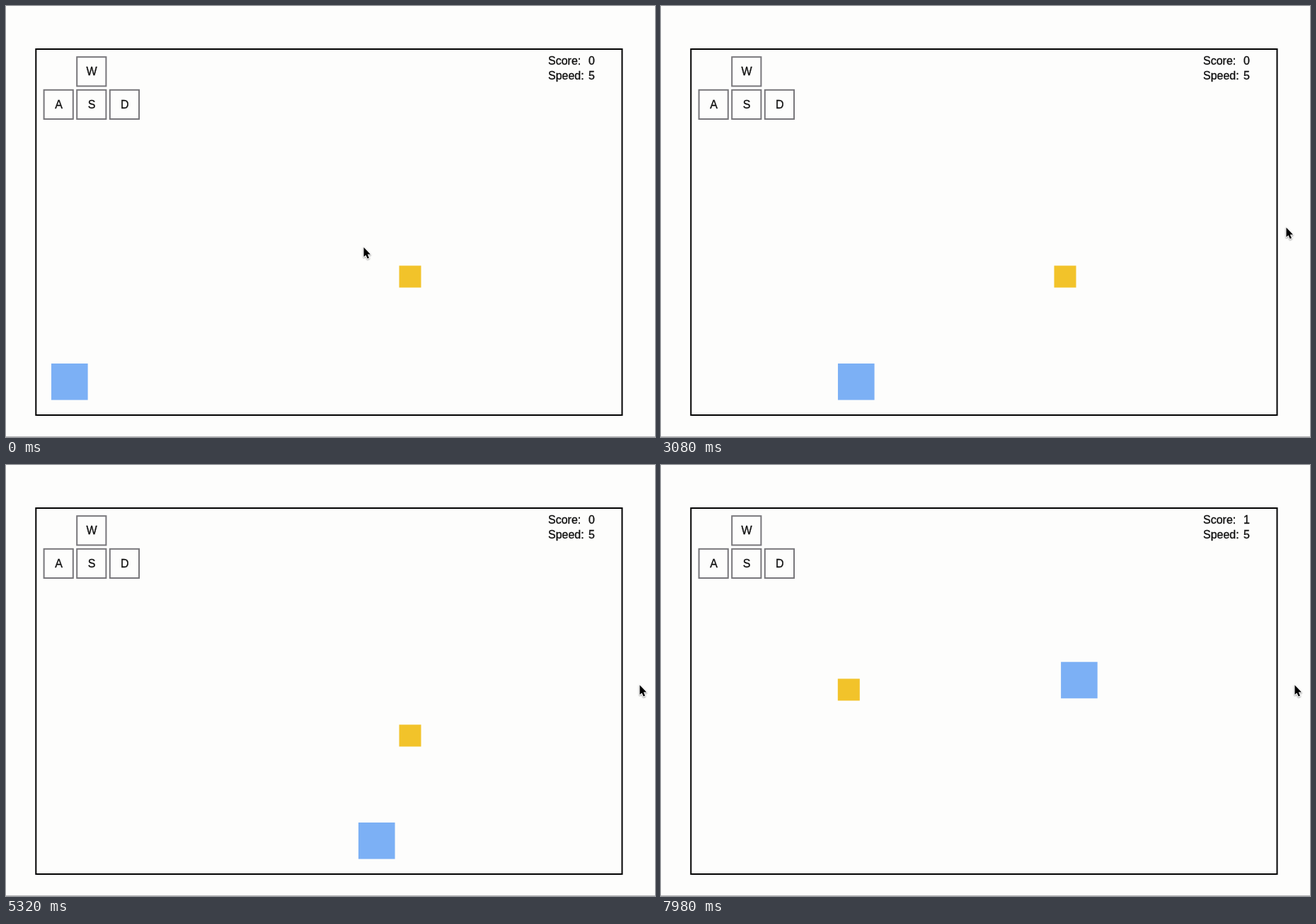
These frames come from a looping animation (917 px wide and 610 px high, 8 s). An HTML page with a canvas:

```html
<!DOCTYPE html>
<html lang="en">
<head>
<meta charset="utf-8">
<title>Square and coin</title>
<style>
html, body { margin: 0; width: 100%; height: 100%; overflow: hidden; background: #fdfdfc; }
canvas { display: block; }
</style>
</head>
<body>
<canvas id="stage" width="917" height="610"></canvas>
<script>
const ctx = document.getElementById('stage').getContext('2d');
const LOOP = 8000, START = 1500, BEAT = 140, TICK = 20;
const STEP = 5.166, RIGHT_STEPS = 97, HIT_STEP = 118;
const KEY = 46.6;

// Each beat holds three ticks: two short ones and a long one.
function tickTime(t) {
  const base = t < START ? 0 : START, u = t - base;
  return base + u - u % BEAT + TICK * Math.min(2, Math.floor(u % BEAT / TICK));
}

function stepCount(t) {
  if (t < START) return 0;
  const u = tickTime(t) - START;
  return 3 * Math.floor(u / BEAT) + u % BEAT / TICK + 1;
}

// Eased pointer moves: from, to, dx, dy
const moves = [
  [0, 420, 282, -22],
  [1440, 1800, 129, -9],
  [2340, 3000, -33, 3],
  [3180, 3700, 13, 1],
  [4020, 4700, -1, -3]
];

function pointerAt(t) {
  let x = 505, y = 340;
  for (const [from, to, dx, dy] of moves) {
    const k = Math.min(1, Math.max(0, (t - from) / (to - from)));
    const e = k * k * (3 - 2 * k);
    x += dx * e;
    y += dy * e;
  }
  return [x, y];
}

function square(x, y, size, color) {
  ctx.fillStyle = color;
  ctx.fillRect(x, y, size, size);
}

function label(text, x, y, align = 'left') {
  ctx.font = '16px "Liberation Sans", Arial, sans-serif';
  ctx.textAlign = align;
  ctx.fillStyle = ctx.strokeStyle = '#111';
  ctx.lineWidth = 0.35;
  ctx.fillText(text, x, y);
  ctx.strokeText(text, x, y);
}

function key(letter, col, row) {
  const x = 52.6 + col * KEY, y = 71.2 + row * KEY;
  ctx.strokeStyle = '#78777b';
  ctx.lineWidth = 2;
  ctx.strokeRect(x + 1, y + 1, 41.2, 41.2);
  label(letter, x + 21.9, y + 27, 'center');
}

function stat(name, value, y) {
  label(name, 766, y);
  label(value, 822.9, y);
}

function pointer(x, y) {
  const arrow = new Path2D('M0 0v13.6l3-2.7 2.2 5.2 2.3-1-2.2-5h4.2z');
  ctx.save();
  ctx.translate(x + 0.5, y + 1.5);
  ctx.lineJoin = 'round';
  ctx.lineWidth = 2;
  ctx.strokeStyle = '#fff';
  ctx.shadowColor = 'rgba(0,0,0,.4)';
  ctx.shadowBlur = 2;
  ctx.shadowOffsetY = 1;
  ctx.stroke(arrow);
  ctx.shadowColor = 'transparent';
  ctx.fillStyle = '#000';
  ctx.fill(arrow);
  ctx.restore();
}

function draw(t) {
  const n = stepCount(t), hit = n >= HIT_STEP;
  ctx.fillStyle = '#fdfdfc';
  ctx.fillRect(0, 0, 917, 610);
  ctx.fillStyle = '#b4b4b6';
  ctx.fillRect(0, 609, 917, 1);

  ctx.strokeStyle = '#000';
  ctx.lineWidth = 2;
  ctx.strokeRect(42.3, 61, 828.2, 518);

  key('W', 1, 0);
  [...'ASD'].forEach((letter, col) => key(letter, col, 1));
  stat('Score:', hit ? 1 : 0, 83);
  stat('Speed:', 5, 103.7);

  const [coinX, coinY] = hit ? [249.8, 302.5] : [555.5, 367.5];
  square(coinX, coinY, 31, '#f2c32a');

  const right = Math.min(n, RIGHT_STEPS), up = n - right;
  square(64 + right * STEP, 506 - up * STEP, 51.6, '#7cb0f5');

  pointer(...pointerAt(tickTime(t)));
}

const began = performance.now();
function loop() {
  draw((performance.now() - began) % LOOP);
  requestAnimationFrame(loop);
}
loop();
</script>
</body>
</html>
```
